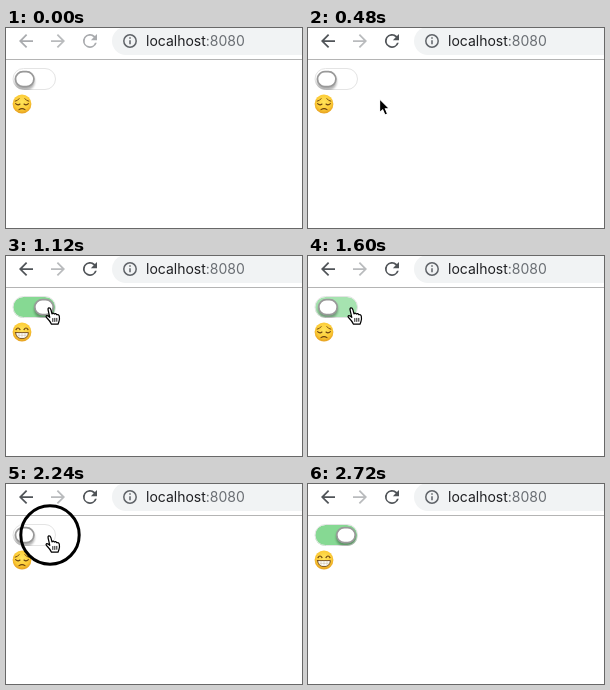
Animation, 296 px wide and 200 px high, one loop 2880 ms. Source, as an HTML page:

```html
<!DOCTYPE html>
<html lang="en">
<head>
<meta charset="utf-8">
<title>Toggle demo</title>
<style>
  html, body { margin: 0; width: 100%; height: 100%; overflow: hidden; background: #fff; }
  svg { display: block; }
  text { font: 14px Inter, Roboto, sans-serif; }
  .line { fill: none; stroke-linecap: round; stroke-linejoin: round; }
</style>
</head>
<body>
<svg width="296" height="200" viewBox="0 0 296 200">
  <defs>
    <radialGradient id="skin" cx=".5" cy=".4" r=".62">
      <stop offset="0" stop-color="#ffe45c"/>
      <stop offset=".65" stop-color="#fccb36"/>
      <stop offset="1" stop-color="#e39a1c"/>
    </radialGradient>
    <clipPath id="trackClip"><rect x="7" y="41" width="43" height="21" rx="10.5"/></clipPath>
    <filter id="soft" x="-30%" y="-30%" width="160%" height="160%"><feGaussianBlur stdDeviation="1"/></filter>
  </defs>

  <!-- browser bar -->
  <g id="nav">
    <path id="back" transform="translate(9.5 2.5) scale(.875)" d="M20 11H7.83l5.59-5.59L12 4l-8 8 8 8 1.41-1.41L7.83 13H20z"/>
    <path fill="#b9bbbd" transform="translate(62.5 2.5) scale(-.875 .875)" d="M20 11H7.83l5.59-5.59L12 4l-8 8 8 8 1.41-1.41L7.83 13H20z"/>
    <path id="reload" transform="translate(73.5 2.5) scale(.875)" d="M17.65 6.35A8 8 0 1 0 19.73 14h-2.08A6 6 0 1 1 12 6c1.66 0 3.14.69 4.22 1.78L13 11h7V4z"/>
  </g>
  <rect x="106" y="-1" width="220" height="28" rx="14" fill="#f1f3f4"/>
  <g stroke="#5f6368" stroke-width="1.5" fill="none">
    <circle cx="124" cy="13" r="6.2"/>
    <path d="M124 12.2v4M124 9.3v1.5"/>
  </g>
  <text x="140" y="18" fill="#202124">localhost<tspan fill="#6a6e73">:8080</tspan></text>
  <rect y="31" width="296" height="1" fill="#b4b4b4"/>

  <!-- switch -->
  <rect x="7" y="41" width="42.5" height="21" rx="10.5" fill="#fff"/>
  <rect id="fill" x="7" y="41" width="42.5" height="21" rx="10.5" fill="#86d993"/>
  <rect x="7" y="40.5" width="42.5" height="21" rx="10.5" fill="none" stroke="#e4e4e4"/>
  <g clip-path="url(#trackClip)">
    <g id="knob">
      <rect x="-10" y="45" width="20" height="17" rx="8" fill="#000" opacity=".3" filter="url(#soft)"/>
      <rect x="-9.2" y="43.6" width="18.4" height="15" rx="7.5" fill="#fff" stroke="#999" stroke-width="1.7"/>
    </g>
  </g>

  <!-- faces -->
  <circle cx="16" cy="76" r="9.4" fill="url(#skin)"/>
  <g id="sad" class="line" stroke="#6b4110" stroke-width="1.1">
    <path d="M9.2 73.2Q11.8 72.8 13.2 70.6M22.8 73.2Q20.2 72.8 18.8 70.6" stroke-width=".9"/>
    <path d="M9.6 75.6Q11.8 77.8 14 76M22.4 75.6Q20.2 77.8 18 76"/>
    <path d="M13 81.6Q16 79.6 19 81.6"/>
  </g>
  <g id="glad" class="line" stroke="#6b4110" stroke-width="1.2">
    <path d="M10 73.6Q12 70.4 14 73.6M18 73.6Q20 70.4 22 73.6"/>
    <path d="M9.6 76.6H22.4Q22 82.6 16 82.6T9.6 76.6Z" fill="#fff" stroke-width=".9"/>
    <path d="M10.4 79.3H21.6M13 77V82M16 77V82.4M19 77V82" stroke="#b9a27c" stroke-width=".4"/>
  </g>

  <circle id="ring" cx="44" cy="51" r="29.2" fill="none" stroke="#000" stroke-width="3"/>

  <!-- pointers -->
  <path id="arrow" d="M.6 .8V14.6L3.7 11.8L6 17.1L8.6 16L6.4 10.8H10.6Z" fill="#000" stroke="#fff" stroke-width="1.1"/>
  <g id="hand" class="line" stroke="#000" stroke-width="1.2">
    <path fill="#fff" d="M4.8 10.4L3.1 3Q2.7 1 4 .9T5.9 2.7L7 6.8Q8 5.3 9.3 7Q10.8 5.9 11.7 7.7Q13.7 7 14.3 9.2L14.5 12Q14.2 14.5 13 17.2H6.5Q5 14 2.2 11.3Q.3 9.2 1.5 8.7Q3 8.3 4.8 10.4Z"/>
    <path d="M7.8 11.5V14.5M9.8 11.3V14.5M11.8 11.3V14.3" stroke-width=".9"/>
  </g>
</svg>
<script>
const STEP = 160, COUNT = 18;
const el = id => document.getElementById(id);
const show = (id, on) => el(id).style.display = on ? '' : 'none';
const place = (id, x, y) => el(id).setAttribute('transform', `translate(${x} ${y})`);

// pointer path before it rests on the switch
const arrowPath = { 1: [135, 141], 2: [139, 121], 3: [71, 70] };

// the knob slides quickly while the colour fades more slowly
function switchState(step) {
  if (step === 6 || step === 15) return { on: true, x: 37, tint: .3 };
  if (step === 10) return { on: false, x: 20, tint: .73 };
  const on = (step > 6 && step < 10) || step > 15;
  return { on, x: on ? 38 : 18.7, tint: on ? 1 : 0 };
}

function draw(now) {
  const step = Math.floor(now / STEP) % COUNT;
  const { on, x, tint } = switchState(step);
  const arrow = arrowPath[step];

  for (const id of ['back', 'reload']) el(id).setAttribute('fill', step < 2 ? '#a9abae' : '#505458');
  el('fill').setAttribute('opacity', tint);
  place('knob', x, 0);
  show('glad', on);
  show('sad', !on);
  show('ring', step === 14);

  show('arrow', arrow);
  if (arrow) place('arrow', ...arrow);
  show('hand', step >= 4 && step < 17);
  place('hand', ...(step === 4 ? [37, 52] : [39, 51]));
}

const start = performance.now();
function tick() {
  draw(performance.now() - start);
  requestAnimationFrame(tick);
}
tick();
</script>
</body>
</html>
```
